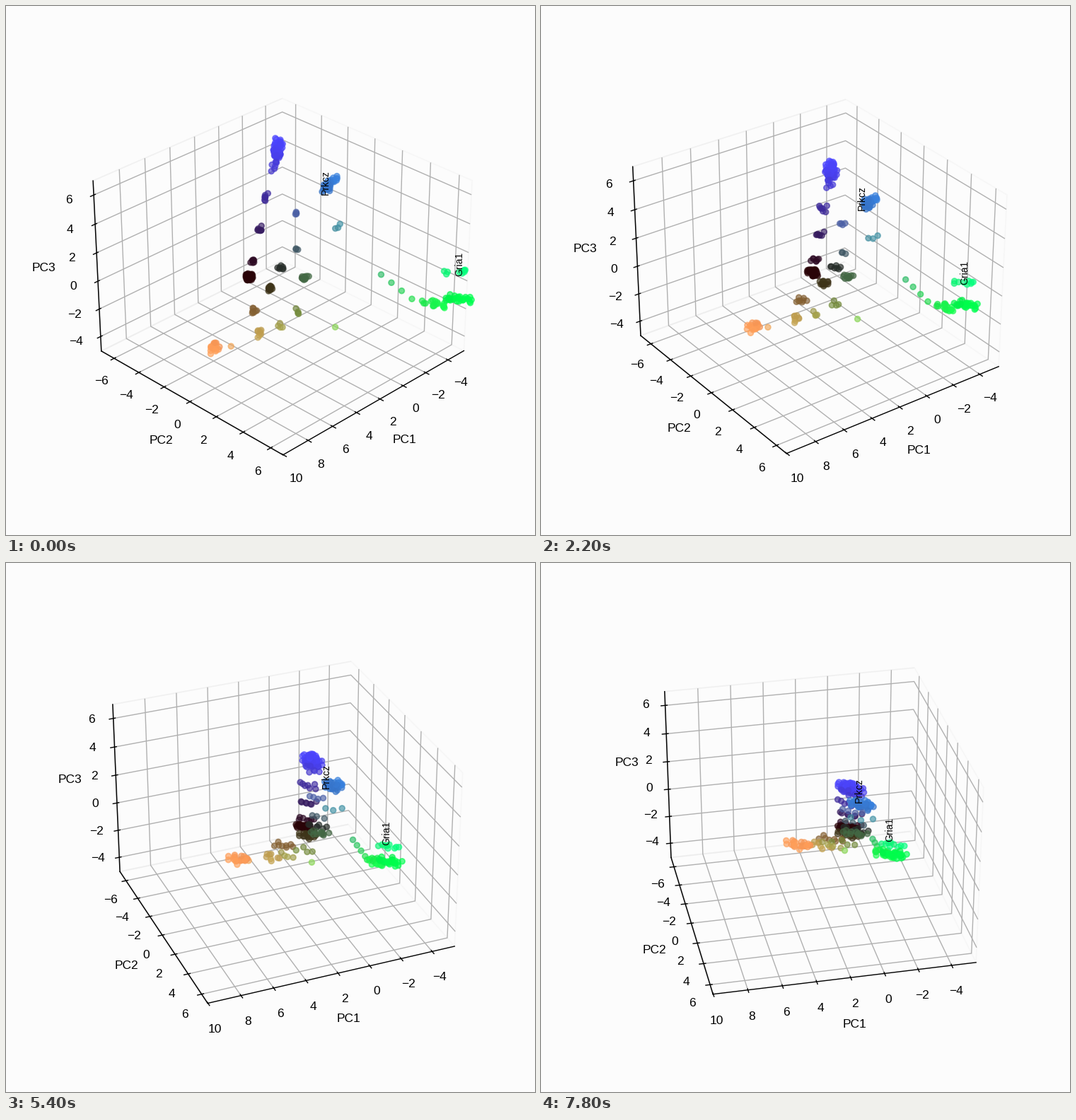
A matplotlib script for the animation above (8 s loop, 748 px wide and 748 px high).

```python
import numpy as np
import matplotlib.pyplot as plt
from matplotlib.animation import FuncAnimation
from matplotlib.colors import to_rgb

SIZE, DPI = 748, 125
FRAMES, INTERVAL = 40, 200
BG = "#fcfcfc"
MID, LAST = 16, FRAMES - 1
FAN = np.array([15, 3])

plt.rcParams.update({"font.family": "Liberation Sans", "font.size": 10})
rng = np.random.default_rng(7)

# stage paths (start, middle, end) of the core and the three arm tips
CORE = np.array([(344, 383), (399, 375), (437, 377)])
TIPS = np.array([
    [(295, 484), (308, 443), (366, 399)],
    [(641, 414), (584, 424), (500, 412)],
    [(384, 202), (419, 246), (437, 318)],
])
CORE_RGB = np.array(to_rgb("#2a0408"))
TIP_RGB = np.array([to_rgb(c) for c in ("#ff9c58", "#00ff4c", "#4a42f5")])
ORANGE, GREEN, BLUE = np.eye(3)
STEEL = np.array([0, 0.28, 0.78])

LABELS = {
    "Prkcz": ((452, 250), (453.5, 281), (449.5, 322)),
    "Gria1": ((641, 365), (580, 380), (493.5, 377)),
}


def blend(path, k):
    """Quadratic path through three positions at frames 0, MID and LAST."""
    a = (k - MID) * (k - LAST) / (MID * LAST)
    b = k * (k - LAST) / (MID * (MID - LAST))
    c = k * (k - MID) / (LAST * (LAST - MID))
    return np.array([a, b, c]) @ np.asarray(path)


weights, jitter, fan = [], [], []


def clump(n, where):
    """n points around a mix of the orange, green and blue arms."""
    loose = n > 1
    stretch = 1 + loose * rng.uniform(-0.06, 0.06, (n, 1))
    weights.append(stretch * where)
    jitter.append(loose * rng.uniform(-1, 1, (n, 2)) * (2 + 0.5 * np.sqrt(n)))
    sway = rng.permutation(np.linspace(-1, 1, n)) if loose else np.zeros(1)
    fan.append(np.outer(sway, FAN))


def strand(steps, n, start, end):
    for where in np.linspace(start, end, steps):
        clump(n, where)


# blue side, far to near
clump(60, BLUE)
strand(4, 7, 0.87 * BLUE, 0.12 * BLUE)
clump(38, STEEL)
clump(4, (0.1, 0.16, 0.58))
strand(2, 3, (0.1, 0.36, 0.5), (0.1, 0.2, 0.3))

# dark core
clump(36, 0 * BLUE)
clump(14, (0.12, 0.12, 0))
clump(7, (0, 0.14, 0.1))
clump(11, (0.15, 0.27, 0.12))

# orange arm with its olive side
strand(2, 8, (0.45, 0.1, 0), (0.74, 0.17, 0))
strand(2, 4, (0.4, 0.29, 0), (0.6, 0.24, 0))
clump(1, (0.55, 0.5, 0))
clump(1, (0.95, 0.07, 0))
clump(24, ORANGE)

# green arm
strand(4, 1, (0.1, 0.62, 0.18), (0.12, 0.79, 0.03))
clump(18, (0.1, 0.9, 0))
clump(9, (0, 0.95, 0.2))
clump(28, GREEN)

weights, jitter, fan = map(np.vstack, (weights, jitter, fan))
colors = np.clip(CORE_RGB + weights @ (TIP_RGB - CORE_RGB), 0, 1)


def place(k):
    core = blend(CORE, k)
    arms = np.array([blend(tip, k) - core for tip in TIPS])
    return core + weights @ arms + jitter + fan * k / LAST


fig = plt.figure(figsize=(SIZE / DPI, SIZE / DPI), dpi=DPI, facecolor=BG)
box = fig.add_subplot(111, projection="3d")
box.set_facecolor(BG)
box.set(xlabel="PC1", ylabel="PC2", zlabel="PC3")
box.set_xlim3d(-5.46, 10.02)
box.set_ylim3d(-7.05, 6.88)
box.set_zlim3d(-5.07, 6.97)
for axis in (box.xaxis, box.yaxis, box.zaxis):
    axis.pane.set_fill(False)

# the points live in stage pixels, above the rotating box
stage = fig.add_axes([0, 0, 1, 1], zorder=5)
stage.set(xlim=(0, SIZE), ylim=(SIZE, 0))
stage.axis("off")
dots = stage.scatter(*place(0).T, s=20, linewidths=1.0, alpha=0.65, c=colors)
tags = {name: stage.text(*path[0], name, rotation=90, size=8,
                         ha="center", va="center")
        for name, path in LABELS.items()}


def draw(k):
    box.view_init(elev=30, azim=44.9 + 0.8455 * k)
    dots.set_offsets(place(k))
    for name, path in LABELS.items():
        tags[name].set_position(blend(path, k))
    return [dots, *tags.values()]


anim = FuncAnimation(fig, draw, frames=FRAMES, interval=INTERVAL,
                     init_func=lambda: draw(0), repeat=True, repeat_delay=0)
plt.show()
```
